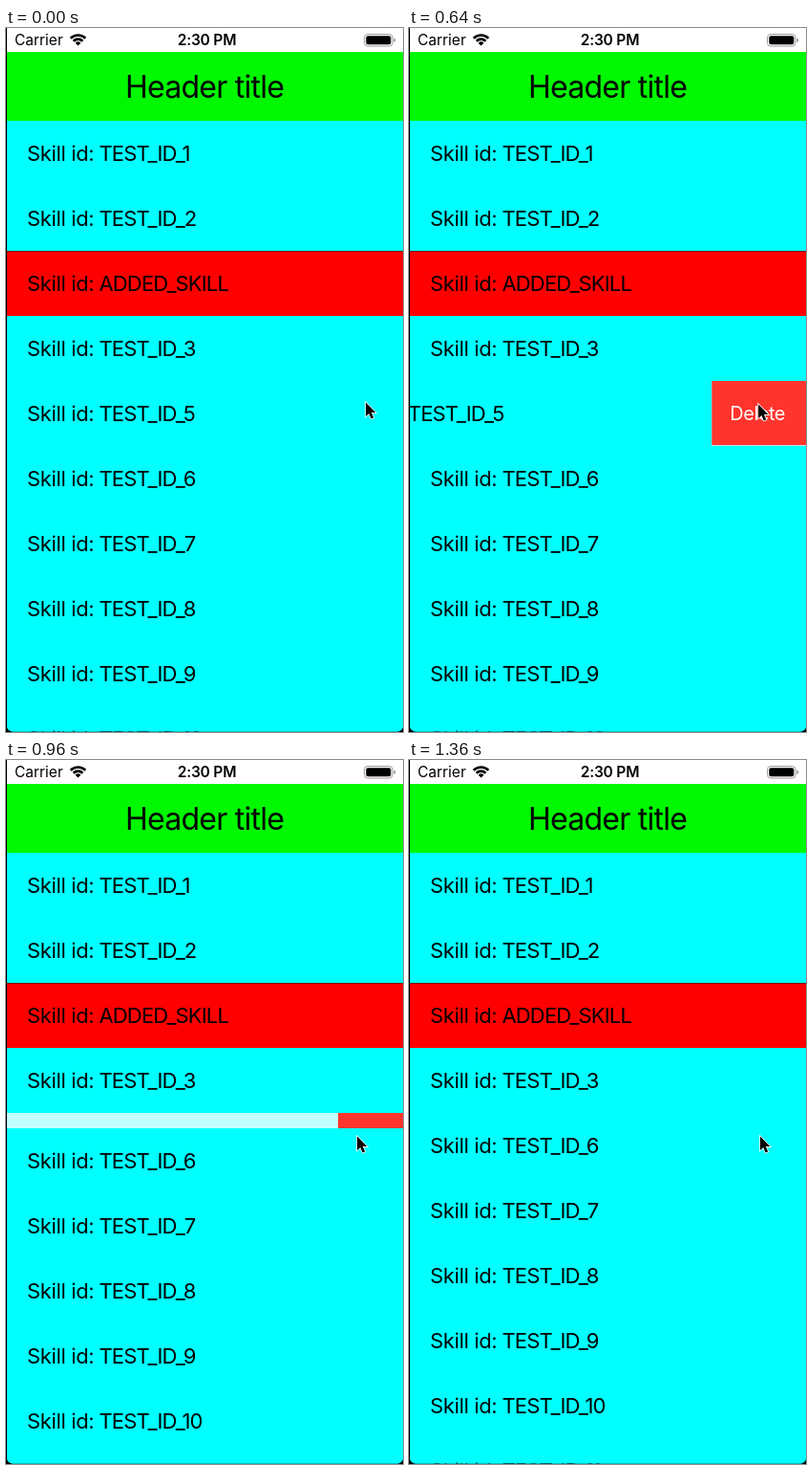
Animation, 416 px wide and 736 px high, one loop 1400 ms. Source, as an HTML page with a canvas:

```html
<!DOCTYPE html>
<html lang="en">
<head>
<meta charset="utf-8">
<title>Swipe to delete</title>
<style>
  html, body { margin: 0; width: 100%; height: 100%; overflow: hidden; background: #000; }
  canvas { display: block; }
</style>
</head>
<body>
<canvas id="stage" width="416" height="736"></canvas>
<script>
const ctx = document.getElementById('stage').getContext('2d');
const W = 416, H = 736, LOOP = 1400, LIST_TOP = 97, ROW = 68, SWIPED = 4;
const CYAN = '#00ffff';
const ids = ['TEST_ID_1', 'TEST_ID_2', 'ADDED_SKILL',
  ...[3, 5, 6, 7, 8, 9, 10, 11].map(n => 'TEST_ID_' + n)];

// Keys are [time, value], joined with smooth steps.
const swipeKeys = [[30, 0], [340, 108], [410, 113], [780, 92]];
const cursorXKeys = [[30, 377], [340, 293], [410, 293], [610, 366], [800, 368]];
const cursorYKeys = [[410, 391.5], [610, 393.5]];

function track(keys, t) {
  if (t <= keys[0][0]) return keys[0][1];
  for (let i = 1; i < keys.length; i++) {
    const [t0, a] = keys[i - 1], [t1, b] = keys[i];
    if (t < t1) {
      const u = (t - t0) / (t1 - t0);
      return a + (b - a) * u * u * (3 - 2 * u);
    }
  }
  return keys[keys.length - 1][1];
}

// Critically damped spring: falls from 1 to 0.
function settle(t, start, rate) {
  const u = Math.max(0, t - start) * rate;
  return (1 + u) * Math.exp(-u);
}

function rect(color, x, y, w, h) {
  ctx.fillStyle = color;
  ctx.fillRect(x, y, w, h);
}

function text(str, x, y, size, tracking = 0, color = '#000', weight = 400, align = 'left') {
  ctx.font = `${weight} ${size}px Inter, sans-serif`;
  ctx.letterSpacing = tracking + 'px';
  ctx.textAlign = align;
  ctx.fillStyle = color;
  ctx.fillText(str, x, y);
}

function drawRow(id, x, y) {
  const added = id === 'ADDED_SKILL';
  rect(added ? '#ff0000' : CYAN, x, y, W, ROW + 1);
  if (added) rect('rgba(0,0,0,.5)', x, y, W, 1);
  text('Skill id:', x + 22, y + 42, 22, -0.35);
  text(id, x + 97.5, y + 42, 22, -0.85);
}

function drawSwipedRow(y, height, offset, alpha) {
  ctx.save();
  ctx.beginPath();
  ctx.rect(0, y, W, height);
  ctx.clip();
  rect('#fff', 0, y, W, height);
  ctx.globalAlpha = alpha;
  drawRow(ids[SWIPED], -offset, y);
  ctx.globalAlpha = 1;
  const left = W - offset;
  rect('#b4eeee', left, y, offset, ROW);
  rect('#ff352d', left, y, offset, ROW - 1);
  text('Delete', left + 19, y + 41, 20, -0.5, '#fff');
  ctx.restore();
}

function drawStatusBar() {
  rect('#fff', 0, 0, W, 25);
  text('Carrier', 9, 18, 15.5);
  text('2:30 PM', 210.5, 18, 15.5, -0.2, '#000', 600, 'center');

  ctx.strokeStyle = '#000';
  ctx.lineWidth = 2.7;
  for (const r of [11, 6.8]) {
    ctx.beginPath();
    ctx.arc(75.5, 18.5, r, -Math.PI * 0.75, -Math.PI * 0.25);
    ctx.stroke();
  }
  ctx.fillStyle = '#000';
  ctx.beginPath();
  ctx.moveTo(75.5, 18.5);
  ctx.arc(75.5, 18.5, 4, -Math.PI * 0.75, -Math.PI * 0.25);
  ctx.fill();

  ctx.strokeStyle = '#999';
  ctx.lineWidth = 1;
  ctx.beginPath();
  ctx.roundRect(375.5, 6.5, 29.5, 12.5, 3.5);
  ctx.stroke();
  ctx.fillStyle = '#000';
  ctx.beginPath();
  ctx.roundRect(377.3, 8.2, 26, 9, 2);
  ctx.fill();
  ctx.fillStyle = '#999';
  ctx.beginPath();
  ctx.arc(406.3, 12.7, 2, -Math.PI / 2, Math.PI / 2);
  ctx.fill();
}

const arrow = new Path2D('M0 0V14.5L3.3 11.5L5.6 17L8.2 16L5.8 10.6H10.3Z');
function drawCursor(x, y) {
  ctx.save();
  ctx.translate(x, y);
  ctx.strokeStyle = '#fff';
  ctx.lineWidth = 1.6;
  ctx.stroke(arrow);
  ctx.fillStyle = '#000';
  ctx.fill(arrow);
  ctx.restore();
}

function draw(now) {
  const t = now % LOOP;
  const remaining = t < 1340 ? settle(t, 816, 0.0191) : 0;
  const height = ROW * remaining;
  const offset = track(swipeKeys, t) * settle(t, 898, 0.0157);

  rect('#000', 0, 0, W, H);
  ctx.save();
  ctx.beginPath();
  ctx.roundRect(1, 0, W - 1, H - 0.5, [0, 0, 6, 6]);
  ctx.clip();
  rect(CYAN, 0, LIST_TOP, W, H);
  ids.forEach((id, i) => {
    const y = LIST_TOP + i * ROW;
    if (i !== SWIPED) drawRow(id, 0, i < SWIPED ? y : y - ROW + height);
  });
  if (height > 0.05) drawSwipedRow(LIST_TOP + SWIPED * ROW, height, offset, remaining);
  rect('#00f800', 0, 25, W, LIST_TOP - 25);
  text('Header title', 208, 73, 32, -0.75, '#000', 400, 'center');
  drawStatusBar();
  ctx.restore();
  drawCursor(track(cursorXKeys, t), track(cursorYKeys, t));
}

function loop() {
  draw(performance.now());
  requestAnimationFrame(loop);
}
loop();
</script>
</body>
</html>
```
